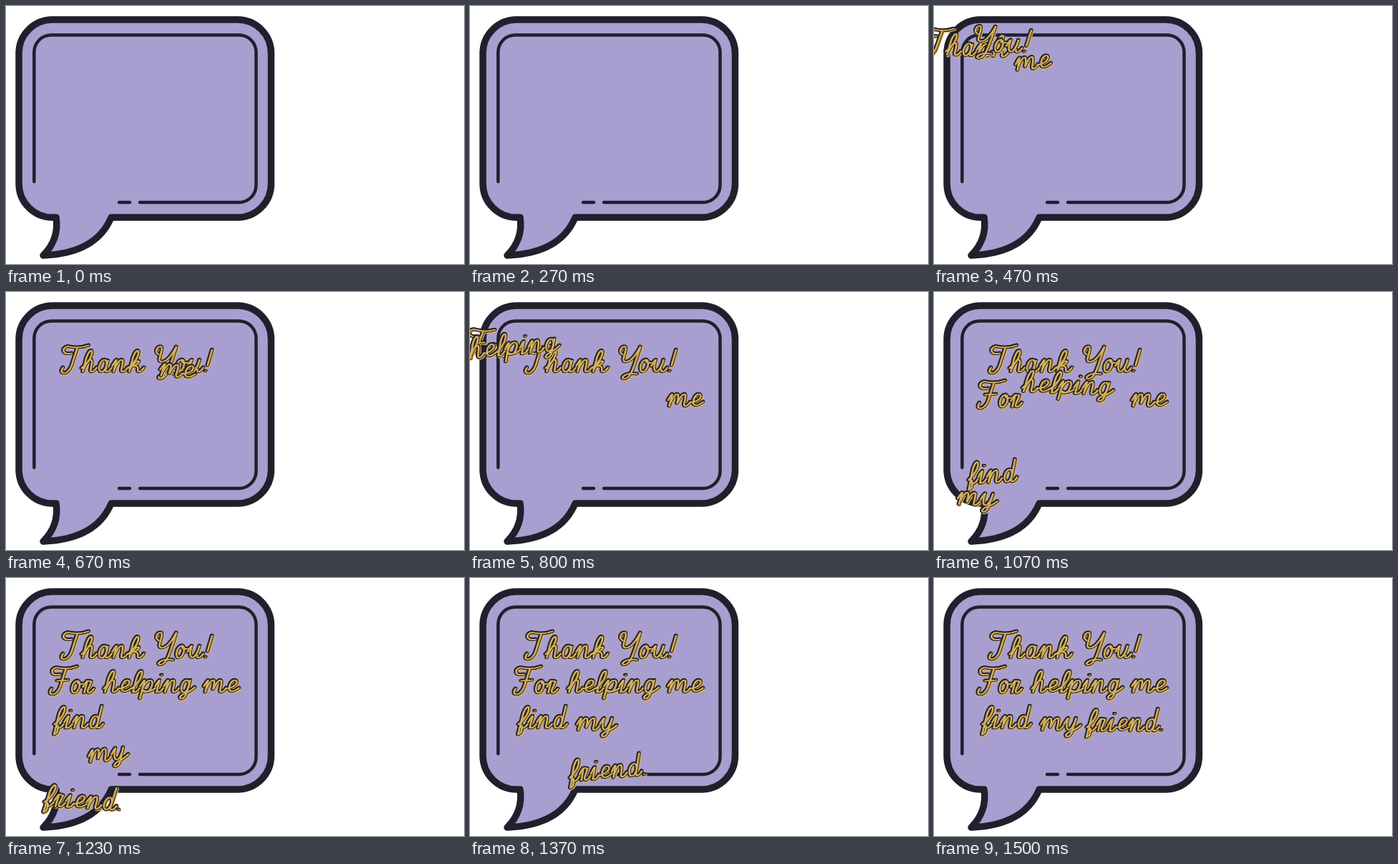
Write an HTML page with a canvas that moves like this. It is 640 by 360 pixels and loops after 5.01 s.

```html
<!DOCTYPE html>
<html lang="en">
<head>
<meta charset="utf-8">
<title>Thank You</title>
<style>
html, body { margin: 0; width: 100%; height: 100%; overflow: hidden; background: #fff; }
canvas { display: block; width: 640px; height: 360px; }
</style>
</head>
<body>
<canvas id="stage" width="640" height="360" role="img" aria-label="Thank You! For helping me find my friend."></canvas>
<script>
const ctx = document.getElementById('stage').getContext('2d');
const LOOP = 5010, TICK = 100 / 3;
const FIRST = 465, FLIGHT = 380;
const INK = '#221f2d', LILAC = '#a89fd0', GOLD = '#d8b255';
const SLANT = 0.25, X = 17, TALL = 31;

// Strokes shared by the script letters; each draws at pen position x and returns the next one.
const STROKES = {
  lead: (p, x) => x + 3,
  stem(p, x) {
    p.moveTo(x - 4, -8);
    p.quadraticCurveTo(x - 1, -X, x, -X);
    p.lineTo(x, 0);
    return x;
  },
  loop(p, x) {
    p.moveTo(x - 3, -5);
    p.bezierCurveTo(x + 14, -22, x + 3, -42, x, -20);
    p.lineTo(x, 0);
    return x;
  },
  arch(p, x) {
    p.moveTo(x, -4);
    p.quadraticCurveTo(x + 3, -X, x + 7, -X);
    p.quadraticCurveTo(x + 10, -X, x + 10, -4);
    return x + 10;
  },
  bowl(p, x) {
    p.moveTo(x + 9, -X / 2);
    p.ellipse(x + 4, -X / 2, 5, X / 2, 0, 0, 2 * Math.PI);
    return x + 9;
  },
  cup(p, x) {
    p.moveTo(x - 4, -8);
    p.quadraticCurveTo(x - 1, -X, x, -X);
    p.bezierCurveTo(x - 2, 5, x + 11, 5, x + 11, -X);
    return x + 11;
  },
  hook(p, x) {
    p.moveTo(x, -4);
    p.bezierCurveTo(x, 2, x + 5, 1, x + 8, -6);
    return x + 9;
  },
  drop(p, x) {
    p.moveTo(x, -X);
    p.lineTo(x - 1, 2);
    p.bezierCurveTo(x - 2, 14, x - 15, 8, x - 4, 2);
    p.quadraticCurveTo(x + 4, -1, x + 9, -7);
    return x + 10;
  },
  eye(p, x) {
    p.moveTo(x - 3, -5);
    p.bezierCurveTo(x + 12, -8, x + 10, -X, x + 5, -X);
    p.bezierCurveTo(x - 3, -X, x - 3, 9, x + 14, -6);
    return x + 14;
  },
  knot(p, x) {
    p.moveTo(x + 7, -X);
    p.quadraticCurveTo(x + 6, -11, x + 15, -13);
    return x + 14;
  },
  belly(p, x) {
    p.moveTo(x, -6);
    p.bezierCurveTo(x + 4, -22, x + 14, -18, x + 12, -8);
    p.bezierCurveTo(x + 11, 1, x + 3, 1, x + 1, -3);
    p.quadraticCurveTo(x + 10, 2, x + 18, -6);
    return x + 18;
  },
  kick(p, x) {
    p.moveTo(x, -4);
    p.bezierCurveTo(x + 5, -22, x + 18, -14, x + 3, -8);
    p.quadraticCurveTo(x + 10, -9, x + 11, -4);
    return x + 11;
  },
  flag(p, x) {
    p.moveTo(x, -X);
    p.quadraticCurveTo(x + 3, -X, x + 6, -X + 1);
    p.lineTo(x + 4, -4);
    return x + 4;
  },
  knee(p, x) {
    p.moveTo(x, 9);
    p.quadraticCurveTo(x + 6, 7, x + 2, -4);
    return x + 2;
  },
  bar(p, x) {
    p.moveTo(x + 8, -26);
    p.bezierCurveTo(x - 8, -22, x - 8, -38, x + 4, -35);
    p.bezierCurveTo(x + 14, -33, x + 22, -34, x + 29, -37);
    return x;
  },
  trunk(p, x) {
    p.moveTo(x + 14, -34);
    p.lineTo(x + 12, -8);
    p.bezierCurveTo(x + 10, 6, x - 4, 4, x + 1, -6);
    return x + 27;
  },
  fork(p, x) {
    p.moveTo(x + 4, -24);
    p.bezierCurveTo(x - 4, -28, x, -37, x + 5, -35);
    p.bezierCurveTo(x + 10, -30, x + 2, -14, x + 11, -14);
    p.quadraticCurveTo(x + 20, -14, x + 26, -35);
    p.bezierCurveTo(x + 24, -10, x + 24, 6, x + 17, 9);
    p.bezierCurveTo(x + 8, 12, x + 10, 0, x + 31, 3);
    return x + 31;
  },
  cross: (p, x) => line(p, x, x + 6, -X, x + 21, -X - 1),
  tick: (p, x) => line(p, x, x, -X + 1, x, -4),
  tall: (p, x) => line(p, x, x, -TALL, x, -4),
  tail: (p, x) => line(p, x, x, -10, x, 9),
  bang: (p, x) => line(p, x, x + 2, -TALL, x + 1, -9),
  dot: (p, x) => line(p, x, x + 1, -24, x + 1.5, -24),
  stop: (p, x) => line(p, x, x, -1, x + 0.5, -1)
};

const LETTERS = {
  T: 'bar trunk', F: 'bar cross trunk', Y: 'fork',
  a: 'lead bowl tick hook', d: 'lead bowl tall hook', e: 'lead eye', f: 'lead loop tail knee hook',
  g: 'lead bowl drop', h: 'lead loop arch hook', i: 'lead stem dot hook', k: 'lead loop kick hook',
  l: 'lead loop hook', m: 'lead stem arch arch hook', n: 'lead stem arch hook', o: 'lead bowl lead knot',
  p: 'lead stem tail belly', r: 'lead stem flag hook', u: 'lead cup hook', y: 'lead cup drop',
  '!': 'lead bang stop', '.': 'lead stop'
};
LETTERS.o = 'lead bowl ring';
STROKES.ring = (p, x) => STROKES.knot(p, x - 11) + 3;

// Resting place, landing time, and how far left and below (or above) the word is 300 ms earlier.
const word = (text, x, y, land, reach, rise) => ({ path: wordPath(text), x, y, land, reach, rise });
const words = [
  word('Thank', 77, 111, 645, 150, -57),
  word('You!', 203, 111, 650, 250, -62),
  word('me', 275, 159, 790, 150, -67),
  word('For', 61, 160, 935, 150, -110),
  word('helping', 135, 159, 1095, 140, -67),
  word('find', 66, 209, 1105, 150, 163),
  word('my', 148, 212, 1300, 150, 95),
  word('friend.', 212, 213, 1480, 195, 115)
];

const bubble = new Path2D('M65,19H323.5A47,47 0 0 1 370.5,66V248A47,47 0 0 1 323.5,295H147C134,326 105,346 52,348C67,333 73,315 70,295H65A47,47 0 0 1 18,248V66A47,47 0 0 1 65,19Z');
const trim = new Path2D('M39.3,245V64.5A24,24 0 0 1 63.3,40.5H325.5A24,24 0 0 1 349.5,64.5V250A24,24 0 0 1 325.5,274H187M173,274H158');

function line(p, x, x1, y1, x2, y2) {
  p.moveTo(x1, y1);
  p.lineTo(x2, y2);
  return x;
}

function wordPath(text) {
  const upright = new Path2D(), slanted = new Path2D();
  let x = 0;
  for (const letter of text) {
    for (const stroke of LETTERS[letter].split(' ')) x = STROKES[stroke](upright, x);
  }
  slanted.addPath(upright, new DOMMatrix([1, 0, -SLANT, 1, 0, 0]));
  return slanted;
}

function strokePath(path, color, width) {
  ctx.strokeStyle = color;
  ctx.lineWidth = width;
  ctx.stroke(path);
}

// A flat nib: repeated sideways so that upright strokes come out heavier.
function penStroke(path, color, width, shift = 0) {
  for (const nib of [-0.6, 0.6]) {
    ctx.save();
    ctx.translate(nib + shift, shift);
    strokePath(path, color, width);
    ctx.restore();
  }
}

function drawWord({ path, x, y, land, reach, rise }, t) {
  const left = Math.max(0, land - t);
  if (t < FIRST || left > FLIGHT) return;
  const p = left / 300;
  ctx.save();
  ctx.translate(x - reach * p, y + rise * Math.sqrt(p));
  ctx.rotate(-Math.sign(rise) * 0.09 * Math.sin(left / 400 * 2 * Math.PI));
  penStroke(path, GOLD, 4.2, 1.3);
  penStroke(path, INK, 4.6);
  penStroke(path, GOLD, 1.5, 0.4);
  ctx.restore();
}

function draw(now) {
  const t = Math.floor((now % LOOP + 4) / TICK) * TICK;
  ctx.fillStyle = '#fff';
  ctx.fillRect(0, 0, 640, 360);
  ctx.lineCap = ctx.lineJoin = 'round';
  ctx.fillStyle = LILAC;
  ctx.fill(bubble);
  strokePath(bubble, INK, 9.5);
  strokePath(trim, INK, 4.5);
  words.forEach(item => drawWord(item, t));
}

let start;
function loop() {
  const now = performance.now();
  start ??= now;
  draw(now - start);
  requestAnimationFrame(loop);
}
loop();
</script>
</body>
</html>
```
